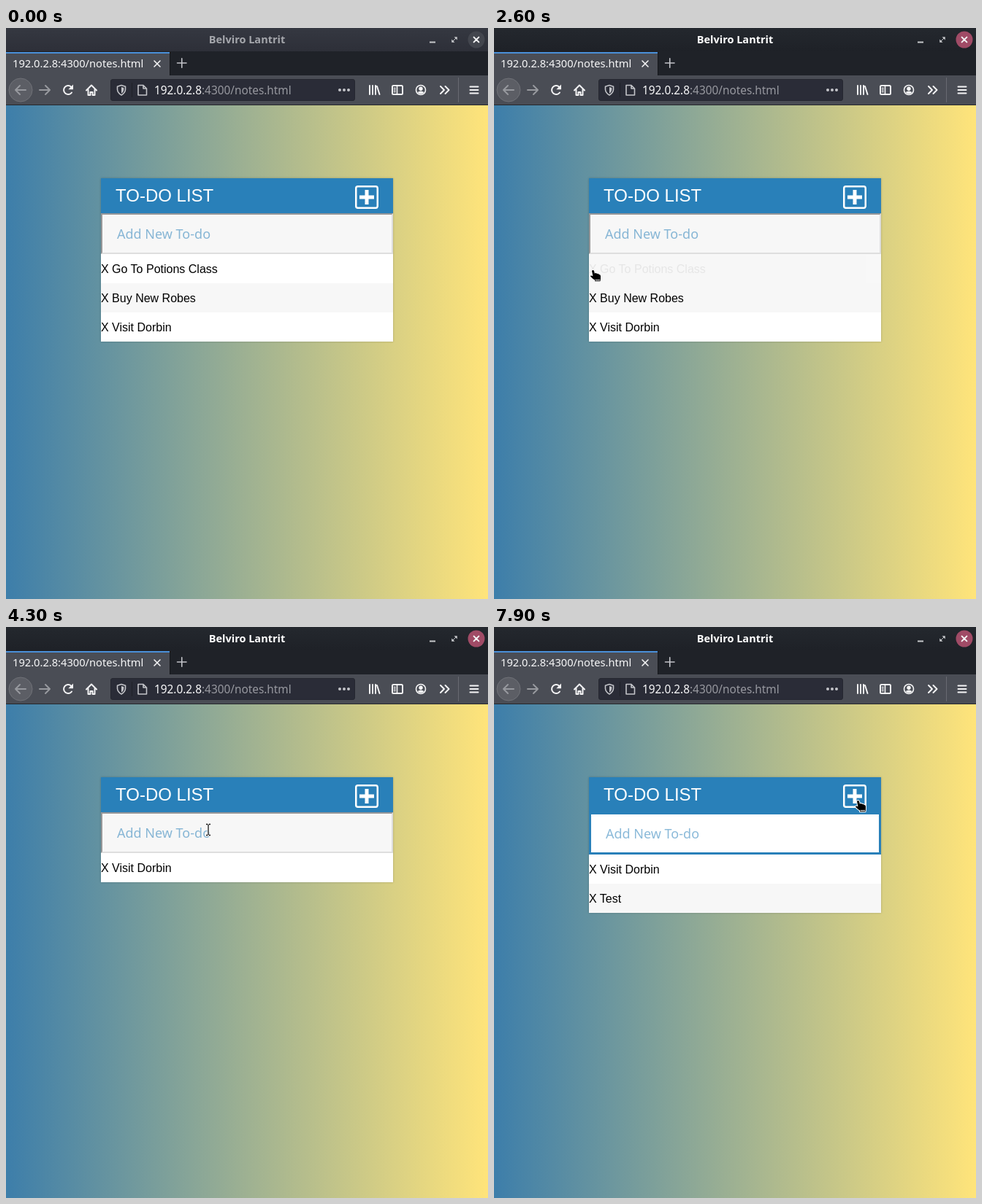
An HTML page for the animation above (8000 ms loop, 660 by 783 pixels).

```html
<!DOCTYPE html>
<html lang="en">
<head>
<meta charset="utf-8">
<title>To-do list</title>
<style>
  html, body { margin: 0; width: 100%; height: 100%; overflow: hidden; }
  svg { display: block; width: 660px; height: 783px; }
  text { white-space: pre; }
  .ui { font-family: "Noto Sans", "Open Sans", sans-serif; }
  .page { font-family: "Liberation Sans", Arial, sans-serif; }
  .icon { fill: none; stroke: #f4f4f5; stroke-width: 2; stroke-linecap: round; stroke-linejoin: round; }
  .thin { stroke-width: 1.6; }
  .soft { stroke: #c3c4c9; stroke-width: 1.6; }
  .dim { stroke: #97999e; }
  #panel { filter: drop-shadow(0 0 1.5px rgba(0, 0, 0, .22)); }
</style>
</head>
<body>
<svg viewBox="0 0 660 783">
  <defs>
    <linearGradient id="sky"><stop stop-color="#3d7eaa"/><stop offset="1" stop-color="#ffe47a"/></linearGradient>
    <linearGradient id="idle" x2="0" y2="1"><stop stop-color="#353841"/><stop offset="1" stop-color="#2d2f38"/></linearGradient>
    <linearGradient id="active" x2="0" y2="1"><stop stop-color="#24282e"/><stop offset="1" stop-color="#1e2127"/></linearGradient>
  </defs>

  <!-- title bar -->
  <rect id="bar" width="660" height="33"/>
  <text id="title" class="ui" x="330" y="21" text-anchor="middle" font-size="14.5" font-weight="700">Belviro Lantrit</text>
  <path d="M580 19.5h8" stroke="#c6c8cb" stroke-width="2"/>
  <path d="M613.5 12.2h4.3v4.3zM610.2 15.5v4.3h4.3z" fill="#c6c8cb"/>
  <path d="M612 18l4-4" stroke="#c6c8cb" stroke-width="1"/>
  <circle id="close" cx="644" cy="16" r="11.5"/>
  <path class="icon" d="M640.6 12.6l6.8 6.8m0-6.8l-6.8 6.8"/>

  <!-- tabs -->
  <rect y="32" width="660" height="33" fill="#1f2228"/>
  <rect y="33" width="224" height="32" fill="#4a4d55"/>
  <rect y="33" width="224" height="2" fill="#4a90d9"/>
  <rect x="224" y="33" width="1" height="32" fill="#15171b"/>
  <text class="ui" x="9" y="54" font-size="14.67" fill="#f7f7f8">192.0.2.8:4300/notes.html</text>
  <path class="icon thin" d="M203 45l8 8m0-8l-8 8"/>
  <path class="icon soft" d="M234.500 48h12.500m-6.250-6.250v12.500"/>

  <!-- toolbar -->
  <rect y="65" width="660" height="41" fill="#4a4d55"/>
  <rect y="105" width="660" height="1" fill="#25272c"/>
  <circle cx="20" cy="85" r="16" fill="#5c5e65" stroke="#707278"/>
  <path class="icon dim" d="M27 85H13m6-6l-6 6l6 6"/>
  <path class="icon dim" d="M46 85h14m-6-6l6 6l-6 6"/>
  <path class="icon" d="M90 88.500a6 6 0 1 1-.8-7.800"/>
  <path d="M92 77.500v6.700h-6.700z" fill="#f4f4f5"/>
  <path class="icon" d="M110 85.500l7-7l7 7M112.500 84.500v7.500h3v-4h3v4h3v-7.500"/>
  <rect x="143.500" y="70.500" width="334" height="29" rx="2.500" fill="#2a2c37" stroke="#252730"/>
  <path class="icon soft" d="M158 78.500l5.500 1.800v4.200q-.4 4.500-5.500 7.500q-5.100-3-5.500-7.500v-4.200z"/>
  <path d="M158 81l3.300 1v3q-.4 2.700-3.300 4.700z" fill="#c3c4c9"/>
  <rect x="172" y="75" width="1" height="20" fill="#1f2129"/>
  <path class="icon soft" d="M181 78.500h7l4.500 4.500v9h-11.500zM188 78.500v4.500h4.500"/>
  <text class="ui" x="203" y="91" font-size="15.35" fill="#97989f"><tspan fill="#f8f8f9">192.0.2.8</tspan>:4300/notes.html</text>
  <g fill="#c3c4c9"><circle cx="457" cy="85" r="2"/><circle cx="463" cy="85" r="2"/><circle cx="469" cy="85" r="2"/></g>
  <path class="icon" d="M498 79v12M502 79v12M506 79v12M508 80l3.500 11"/>
  <rect class="icon" x="529" y="79" width="14" height="12" rx="1.500"/>
  <path class="icon thin" d="M535.500 79v12M531.500 82.500h1.500M531.500 85h1.500M531.500 87.500h1.500"/>
  <circle class="icon thin" cx="568" cy="85" r="6.500"/>
  <circle cx="568" cy="83.300" r="2.700" fill="#f4f4f5"/>
  <path d="M563.500 88q4.500-3 9 0q-4.500 5-9 0z" fill="#f4f4f5"/>
  <path class="icon" d="M595 80l5 5l-5 5M601.500 80l5 5l-5 5"/>
  <rect x="619" y="68" width="1" height="34" fill="#686a72"/>
  <path class="icon" d="M635.500 80.500h11m-11 4.500h11m-11 4.500h11"/>

  <!-- page -->
  <rect y="106" width="660" height="677" fill="url(#sky)"/>
  <rect id="panel" x="130" y="206" width="400" fill="#f7f7f7"/>
  <rect x="130" y="206" width="400" height="48" fill="#2980b9"/>
  <text class="page" x="150" y="238" font-size="24" fill="#fff">TO-DO LIST</text>
  <rect x="479.250" y="217.250" width="29.500" height="29.500" rx="2.500" fill="none" stroke="#fff" stroke-width="2.500"/>
  <path d="M484 232h20m-10-10v20" stroke="#fff" stroke-width="5"/>
  <g id="blurred">
    <rect x="130" y="254" width="400" height="56" fill="#dedede"/>
    <path d="M130 254h400l-2 2h-396v52l-2 2z" fill="#979799"/>
    <rect x="132" y="256" width="396" height="52" fill="#f7f7f7"/>
  </g>
  <g id="focused">
    <rect x="130" y="254" width="400" height="58" fill="#2980b9"/>
    <rect x="133" y="257" width="394" height="52" fill="#fff"/>
  </g>
  <text id="field" class="ui" font-size="18" fill="#2980b9"></text>
  <rect id="caret" y="270" width="2" height="26" fill="#2980b9"/>
  <g id="rows"></g>

  <!-- pointers -->
  <g id="arrow" fill="#111" stroke="#fff" stroke-linejoin="round">
    <path d="M.5.5v16l3.800-3.500l2.700 6l2.600-1.200l-2.600-5.800h5z"/>
  </g>
  <g id="hand">
    <path d="M3 2Q4.500 0 6 2L6.800 5.500Q9 4.500 10 6Q12 5.300 12.700 7Q14.800 6.800 15 9V13L14.500 16.200H7V14.500Q4 13 1 9.500Q1 7.500 4.400 9.200Z"
      fill="#000" stroke="#fff" stroke-width="2" stroke-linejoin="round" paint-order="stroke"/>
    <path d="M7.500 14.700h6.500" stroke="#fff" stroke-width="1"/>
  </g>
  <g id="beam" fill="none">
    <path d="M-3-7.500h6M0-7.500v15M-3 7.500h6" stroke="#fff" stroke-width="3"/>
    <path d="M-3-7.500h2.300m1.400 0h2.300M0-7v14M-3 7.500h2.300m1.400 0h2.300" stroke="#111" stroke-width="1.300"/>
  </g>
</svg>
<script>
  const LOOP = 8000, TICK = 100, FADE = 500;
  const $ = id => document.getElementById(id);
  const set = (el, attrs) => { for (const k in attrs) el.setAttribute(k, attrs[k]); };
  const show = (el, on) => { el.style.display = on ? "" : "none"; };
  const latest = (steps, t) => steps.filter(s => s[0] <= t).pop();

  // Each step: start time, then the value held from there.
  const lists = [
    [0, ["Go To Potions Class", "Buy New Robes", "Visit Dorbin"]],
    [2700, ["Buy New Robes", "Visit Dorbin"]],
    [3900, ["Visit Dorbin"]],
    [6700, ["Visit Dorbin", "Test"]]
  ];
  const fades = [2180, 3380];
  const typed = [[0, ""], [5300, "T"], [5500, "Te"], [5600, "Tes"], [5700, "Test"], [6700, ""]];
  const pointer = [
    [0, ""],
    [500, "arrow", 97, 582], [600, "arrow", 24, 571], [800, "arrow", 22, 560],
    [900, "arrow", 30, 520], [1000, "arrow", 48, 470], [1100, "arrow", 72, 425],
    [1200, "arrow", 98, 385], [1300, "arrow", 115, 360], [1400, "arrow", 121, 351],
    [1500, "arrow", 127, 343], [1600, "hand", 130, 332], [1700, "hand", 131, 331],
    [4000, "arrow", 158, 324], [4100, "beam", 225, 290], [4200, "beam", 275, 279],
    [4300, "beam", 277, 278], [4600, "beam", 277, 281], [4700, "beam", 276.5, 286],
    [4800, "beam", 276.5, 290], [7300, "arrow", 450, 215], [7400, "arrow", 589, 158],
    [7700, "arrow", 604, 180], [7800, "arrow", 542, 232], [7900, "hand", 494, 237]
  ];

  const rows = [0, 1, 2].map(() => {
    const make = (tag, parent) => parent.appendChild(document.createElementNS("http://www.w3.org/2000/svg", tag));
    const group = make("g", $("rows")), back = make("rect", group), label = make("text", group);
    set(back, { x: 130, width: 400, height: 40 });
    set(label, { x: 130, y: 26, class: "page", "font-size": 16 });
    return { group, back, label };
  });

  function fadeLevel(t) {
    const start = fades.find(s => t >= s && t < s + FADE);
    return start === undefined ? 1 : 0.5 + Math.cos(Math.PI * (t - start) / FADE) / 2;
  }

  function drawTitle(active) {
    set($("bar"), { fill: active ? "url(#active)" : "url(#idle)" });
    set($("title"), { fill: active ? "#fff" : "#a5a7ac" });
    set($("close"), { fill: active ? "#a04b66" : "#43464e" });
  }

  function drawField(t, focus) {
    const value = latest(typed, t)[1], field = $("field");
    show($("blurred"), !focus);
    show($("focused"), focus);
    field.textContent = value || "Add New To-do";
    set(field, { x: focus ? 153 : 152, y: focus ? 290 : 289, "fill-opacity": value ? 1 : 0.54 });
    show($("caret"), value || t === 6700);
    set($("caret"), { x: 153 + (value ? Math.round(field.getComputedTextLength()) - 1 : 0) });
  }

  function drawRows(t, top) {
    const items = latest(lists, t)[1];
    set($("panel"), { height: top - 206 + items.length * 40 });
    rows.forEach(({ group, back, label }, i) => {
      show(group, i < items.length);
      label.textContent = "X " + (items[i] || "");
      set(back, { fill: i % 2 ? "#f7f7f7" : "#fff" });
      set(group, { transform: `translate(0 ${top + i * 40})`, opacity: i ? 1 : fadeLevel(t) });
    });
  }

  function drawPointer(t) {
    const [, kind, x, y] = latest(pointer, t);
    for (const id of ["arrow", "hand", "beam"]) {
      show($(id), id === kind);
      if (id === kind) set($(id), { transform: `translate(${x} ${y})` });
    }
  }

  function draw(ms) {
    const t = Math.floor(ms % LOOP / TICK) * TICK;
    const focus = t >= 4400;
    drawTitle(t >= 2100);
    drawField(t, focus);
    drawRows(t, focus ? 312 : 310);
    drawPointer(t);
  }

  const begin = performance.now();
  function loop() {
    draw(performance.now() - begin);
    requestAnimationFrame(loop);
  }
  loop();
</script>
</body>
</html>
```
